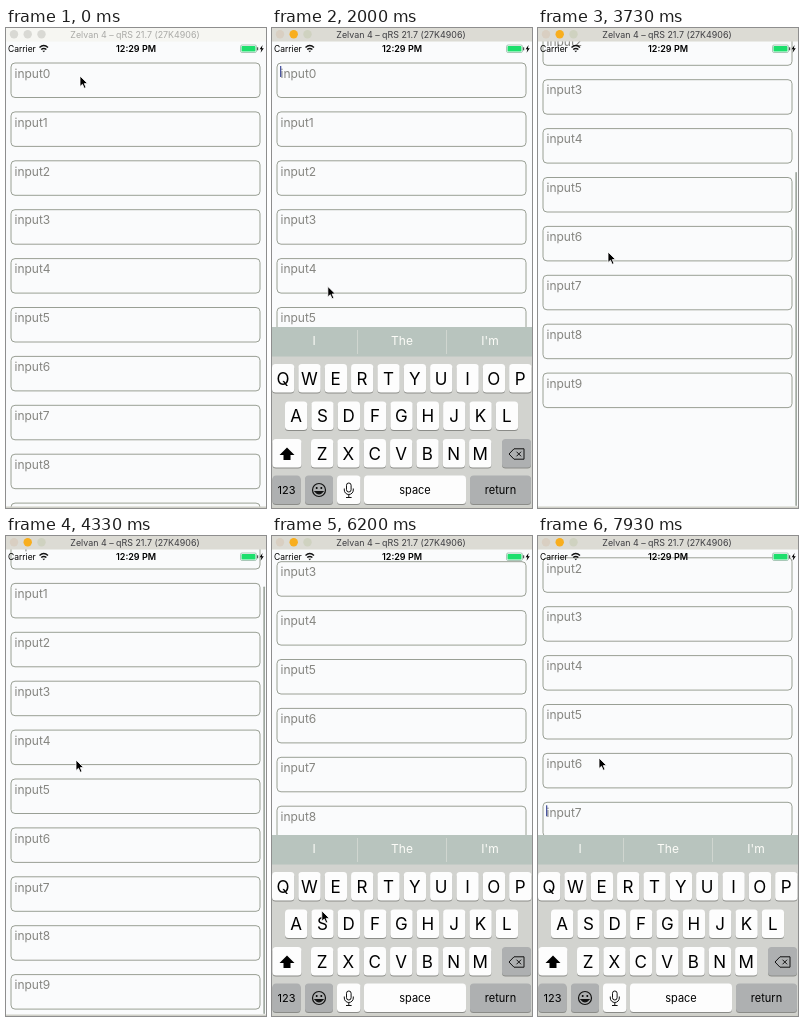
Recreate the animation shown at these times as an HTML page. Size 260 by 480 pixels, loop 8000 ms.

```html
<!DOCTYPE html>
<html lang="en">
<head>
<meta charset="utf-8">
<title>Keyboard and form</title>
<style>
  html, body { margin: 0; width: 100%; height: 100%; overflow: hidden; background: #fafbfc; }
  svg { display: block; width: 100vw; height: 100vh; font-family: Inter, Roboto, sans-serif; }
  .box { fill: none; stroke: #8f968a; stroke-width: .9; }
  .label { font-size: 12px; fill: #858580; }
  .key { font-size: 17px; text-anchor: middle; }
  .small { font-size: 11px; text-anchor: middle; }
  .hint { font-size: 12px; text-anchor: middle; fill: #fcfcf8; }
  .line { fill: none; stroke: #111; }
</style>
</head>
<body>
<svg viewBox="0 0 260 480">
  <g id="form"></g>
  <rect id="scrollbar" x="257.3" width="1.7" rx=".8" fill="#a0a8a0"/>

  <g id="status">
    <text x="2" y="24" font-size="8.5">Carrier</text>
    <g class="line" stroke-width="1.4">
      <path d="M33.5 19.5Q37.8 15.6 42 19.5M35.2 21.6Q37.8 19.3 40.4 21.6"/>
      <path d="M36.4 22.8h2.8l-1.4 1.5z" fill="#111" stroke="none"/>
    </g>
    <text x="130" y="24" font-size="9" font-weight="600" text-anchor="middle">12:29 PM</text>
    <rect x="234.5" y="17" width="16" height="7.5" rx="1.6" fill="#fff" stroke="#84b09a" stroke-width=".7"/>
    <rect x="235.5" y="18" width="14" height="5.5" rx=".8" fill="#1cdf6c"/>
    <rect x="251" y="19.3" width="1.2" height="3" fill="#555"/>
    <path d="M256.6 17l-3 4.3h1.8l-.8 3.4 3.2-4.5h-1.9z"/>
  </g>

  <g id="keyboard"></g>

  <rect id="bar" width="260" height="13.5"/>
  <g id="lights">
    <circle cx="8" cy="6.3" r="4.2"/><circle cx="21.7" cy="6.3" r="4.2"/><circle cx="35.5" cy="6.3" r="4.2"/>
  </g>
  <text id="title" x="129" y="9.7" font-size="8.9" text-anchor="middle">Zelvan 4 – qRS 21.7 (27K4906)</text>
  <rect y="478.5" width="260" height="1.5" fill="#d0d0c8"/>
  <path id="pointer" d="M0 0V10.5L2.5 8.3 4.2 12.3 6 11.5 4.3 7.6H7.6Z" stroke="#fff" stroke-width=".8"/>
</svg>
<script>
const LOOP = 8000, BOX_TOP = 35, BOX_STEP = 48.9, KEYBOARD_TOP = 299, STAGE_BOTTOM = 480;
const $ = id => document.getElementById(id);

// Form
let form = '';
for (let i = 0; i < 10; i++) {
  const y = BOX_TOP + i * BOX_STEP;
  form += `<rect class="box" x="5" y="${y}" width="249" height="34.5" rx="4"/>
    <text class="label" x="8.5" y="${y + 14.7}">input${i}</text>`;
}
$('form').innerHTML = form + '<rect id="caret" x="8" width="1.3" height="11" fill="#4b56a0"/>';

// Keyboard, laid out from its own top edge
const key = (x, y, w, fill = '#fdfdfd') =>
  `<rect x="${x}" y="${y + 1}" width="${w}" height="28.5" rx="3.5" fill="#8b8c88"/>
   <rect x="${x}" y="${y}" width="${w}" height="28.5" rx="3.5" fill="${fill}"/>`;
const GRAY = '#aeb0b1', ROW_Y = [37, 74.5, 112, 148.5];
const [, , row3, row4] = ROW_Y;

let keys = `<rect width="260" height="182" fill="#d2d3cf"/>
  <rect width="260" height="29.5" fill="#b8c4be"/>
  <path d="M85.5 3v24M174.5 3v24" stroke="#d0d6d0"/>`;
["I", "The", "I'm"].forEach((word, i) => keys += `<text class="hint" x="${42 + i * 88}" y="18.3">${word}</text>`);
[['QWERTYUIOP', 11], ['ASDFGHJKL', 24], ['ZXCVBNM', 50]].forEach(([letters, start], row) => {
  [...letters].forEach((letter, i) => {
    const x = start + i * 26.35, y = ROW_Y[row];
    keys += key(x - 11, y, 22.3) + `<text class="key" x="${x}" y="${y + 20.5}">${letter}</text>`;
  });
});
keys += key(.5, row3, 29) + key(230, row3, 29, GRAY)
  + key(.5, row4, 28, GRAY) + key(33, row4, 28, GRAY) + key(65, row4, 23.5)
  + key(92, row4, 102) + key(198, row4, 61, GRAY)
  + `<path d="M15 120.5l7.5 7.5h-4v5h-7v-5h-4z"/>
  <path class="line" d="M237 127l5-5.2h10v10.4h-10zM244.5 124.7l4.6 4.6m0-4.6l-4.6 4.6"/>
  <g class="line" stroke-width="1.2"><circle cx="47" cy="163" r="6.5"/>
    <path d="M43 164.5q4 5 8 0z" fill="#111"/></g>
  <circle cx="44.7" cy="161" r="1"/><circle cx="49.3" cy="161" r="1"/>
  <rect class="line" x="74.5" y="156" width="4.6" height="9" rx="2.3"/>
  <path class="line" d="M72.3 161.5v1.5a4.5 4.5 0 0 0 9 0v-1.5M76.8 167.5v3M74 170.5h5.6"/>
  <text class="small" x="14.5" y="167">123</text>
  <text class="small" x="143" y="167">space</text>
  <text class="small" x="228.5" y="167">return</text>`;
$('keyboard').innerHTML = keys;

// Timelines: [start, end, value reached]
const easeOut = p => 1 - (1 - p) ** 3;
const easeInOut = p => p * p * (3 - 2 * p);
const KEYBOARD = [[630, 1030, 1], [3150, 3500, 0], [5438, 5838, 1], [6450, 6800, 0], [7067, 7467, 1]];
const SCROLL = [[2370, 2670, 9], [3050, 3600, 130], [3770, 4250, 36.5], [5470, 5850, 156], [7067, 7467, 111]];
const POINTER_X = [[1350, 2150, 54], [2850, 3450, 70], [4350, 5100, 48], [6050, 6700, 61]];
const POINTER_Y = [[1350, 2150, 279.5], [2850, 3450, 224], [4350, 5100, 399], [6050, 6700, 222]];
// [from, to, focused input]
const FOCUS = [[630, 2350, 0], [2350, 3150, 5], [5430, 6450, 8], [7060, LOOP, 7]];

function valueAt(t, initial, steps, ease) {
  let value = initial;
  for (const [start, end, next] of steps) {
    if (t < start) break;
    value += (next - value) * ease(Math.min(1, (t - start) / (end - start)));
  }
  return value;
}

function draw(now) {
  const t = now % LOOP;
  const scroll = valueAt(t, 0, SCROLL, easeOut);
  const raised = valueAt(t, 0, KEYBOARD, easeOut);
  const active = t >= 600;

  $('form').setAttribute('transform', `translate(0 ${-scroll})`);
  $('keyboard').setAttribute('transform',
    `translate(0 ${STAGE_BOTTOM - raised * (STAGE_BOTTOM - KEYBOARD_TOP)})`);
  $('pointer').setAttribute('transform',
    `translate(${valueAt(t, 74, POINTER_X, easeInOut)} ${valueAt(t, 48, POINTER_Y, easeInOut)})`);

  const focus = FOCUS.find(([from, to]) => t >= from && t < to);
  const blink = focus ? (t - focus[0]) % 1000 : 0;
  $('caret').setAttribute('opacity', focus && (blink < 550 || blink > 800) ? 1 : 0);
  if (focus) $('caret').setAttribute('y', BOX_TOP + focus[2] * BOX_STEP + 3);

  const scrolling = (t > 3050 && t < 4400) || (t > 7067 && t < 7600);
  $('scrollbar').setAttribute('opacity', scrolling ? 1 : 0);
  $('scrollbar').setAttribute('y', 14 + scroll);
  $('scrollbar').setAttribute('height', 464 - scroll);

  $('bar').setAttribute('fill', active ? '#dcdbd4' : '#f6f6f2');
  $('title').setAttribute('fill', active ? '#3c3c40' : '#a9a9a6');
  const lights = active ? ['#d9cfc2', '#f8ae1e', '#cfd2c0'] : ['#d9d9d4', '#d9d9d4', '#d9d9d4'];
  [...$('lights').children].forEach((dot, i) => dot.setAttribute('fill', lights[i]));
}

const begin = performance.now();
function loop() {
  draw(performance.now() - begin);
  requestAnimationFrame(loop);
}
loop();
</script>
</body>
</html>
```
